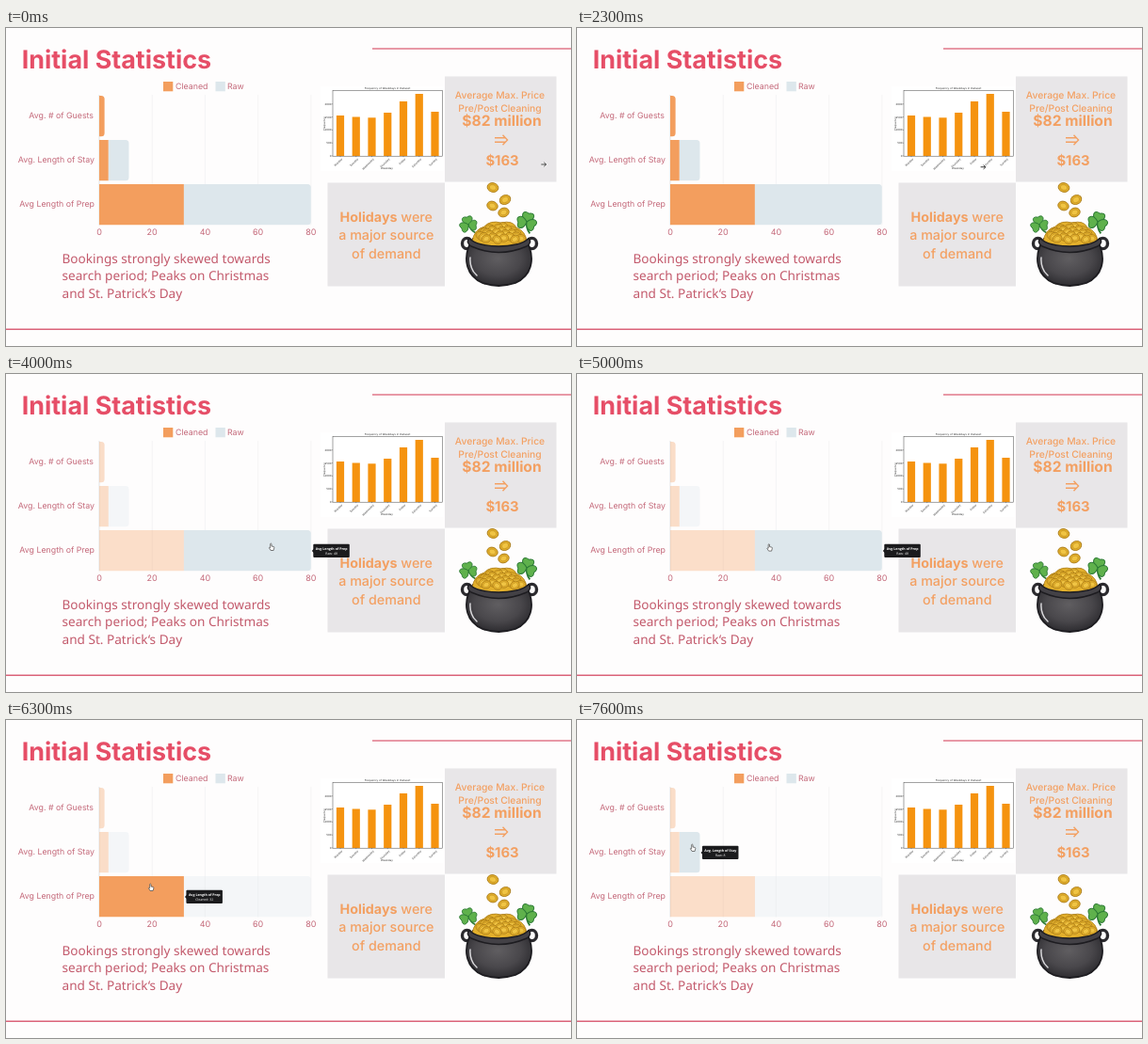
Recreate the animation shown at these times as an HTML page. Size 600x338 px, loop 8 s.

```html
<!DOCTYPE html>
<html lang="en">
<head>
<meta charset="utf-8">
<title>Initial Statistics</title>
<style>
  html, body { margin: 0; width: 100%; height: 100%; overflow: hidden; background: #fefdfd; }
  svg { display: block; width: 100vw; height: 100vh; font-family: Inter, sans-serif; text-rendering: geometricPrecision; }
  .label { font-size: 8.8px; fill: #c4697a; }
  .end { text-anchor: end; }
  .mid { text-anchor: middle; }
  .body { font: 13.6px "Noto Sans", sans-serif; fill: #c35a6c; }
  .card { fill: #e8e6e8; }
  .price, .holiday { fill: #f3a062; text-anchor: middle; font-weight: 500; }
  .price { font-size: 10.3px; }
  .holiday { font-size: 14.3px; }
  .bold { font-weight: 700; }
  .tiny { font: 2.8px "DejaVu Sans", sans-serif; fill: #333; }
</style>
</head>
<body>
<svg viewBox="0 0 600 338">
  <defs>
    <radialGradient id="iron" cx=".48" cy=".42" r=".6">
      <stop offset="0" stop-color="#605e61"/>
      <stop offset=".6" stop-color="#49474b"/>
      <stop offset="1" stop-color="#2b2a2e"/>
    </radialGradient>
    <path id="leaf" d="M0 0C-7 -3 -6 -10 0 -7.3C6 -10 7 -3 0 0" fill="#5fb14c" stroke="#2c7a34" stroke-width=".8"/>
    <g id="clover">
      <path d="M0 0Q1 6 5 9" fill="none" stroke="#2c7a34" stroke-width="1.5"/>
      <use href="#leaf"/>
      <use href="#leaf" transform="rotate(108)"/>
      <use href="#leaf" transform="rotate(-108)"/>
    </g>
    <g id="coin">
      <ellipse rx="5.3" ry="4.8" fill="#e3b02c" stroke="#a97a17" stroke-width=".8"/>
      <ellipse rx="3.4" ry="2.9" fill="#f0c443" stroke="#c08f1f" stroke-width=".6"/>
    </g>
  </defs>

  <path d="M389 22H600" stroke="#e0788a" stroke-width="1.3"/>
  <path d="M0 320.2H600" stroke="#db6379" stroke-width="1.5"/>
  <text x="16.7" y="43" font-size="26.9" font-weight="700" fill="#e64e67">Initial Statistics</text>

  <rect x="167" y="57" width="10.3" height="10.3" fill="#f39e5e"/>
  <rect x="222.5" y="57" width="10.3" height="10.3" fill="#dde7ec"/>
  <text class="label" x="180" y="65">Cleaned</text>
  <text class="label" x="235" y="65">Raw</text>
  <g id="grid"></g>
  <g id="bars"></g>
  <text class="label end" x="93" y="96.2">Avg. # of Guests</text>
  <text class="label end" x="94" y="143.4">Avg. Length of Stay</text>
  <text class="label end" x="94" y="190.4">Avg Length of Prep</text>

  <text class="body" x="59.5" y="249.5">Bookings strongly skewed towards</text>
  <text class="body" x="59.5" y="268.2">search period; Peaks on Christmas</text>
  <text class="body" x="59.5" y="286.8">and St. Patrick‘s Day</text>

  <rect class="card" x="466" y="51.5" width="118.5" height="112"/>
  <rect class="card" x="341.5" y="164.5" width="124.5" height="110"/>
  <text class="price" x="524.5" y="75">Average Max. Price</text>
  <text class="price" x="524.5" y="89">Pre/Post Cleaning</text>
  <text class="price bold" x="526.5" y="104" style="font-size:15.6px">$82 million</text>
  <path d="M519 116.8H530.5M519 121.2H530.5M527.5 113.8L532.5 119L527.5 124.2" fill="none" stroke="#f3a062" stroke-width="1.4"/>
  <text class="price bold" x="527" y="145.5" style="font-size:14.8px">$163</text>
  <text class="holiday" x="403.8" y="206"><tspan class="bold">Holidays</tspan> were</text>
  <text class="holiday" x="403.8" y="225">a major source</text>
  <text class="holiday" x="403.8" y="244.5">of demand</text>

  <g id="weekdays"></g>

  <g id="pot">
    <g id="falling"></g>
    <use href="#clover" transform="translate(491 209) rotate(-12) scale(1.1)"/>
    <use href="#clover" transform="translate(553 206) rotate(14) scale(1.25)"/>
    <g fill="none" stroke="#2b2a2e" stroke-width="3.4">
      <ellipse cx="489.5" cy="229" rx="5" ry="5.6"/>
      <ellipse cx="558.5" cy="229" rx="5" ry="5.6"/>
    </g>
    <path d="M496 224C485 240 486 262 506 271Q523 277 541 271C561 262 562 240 551 224Z" fill="url(#iron)" stroke="#1d1c20" stroke-width="1.8"/>
    <path d="M493 244Q492 256 500 263" fill="none" stroke="#d8d7da" stroke-width="1.5" stroke-linecap="round"/>
    <path d="M495 227Q497 214 508 211Q514 204 526 207Q538 204 542 212Q552 216 553 227Q523 242 495 227Z" fill="#e3b02c" stroke="#a97a17" stroke-width=".8"/>
    <g id="pile"></g>
    <path d="M492 223.5Q496 228 505 230Q523 234 542 230Q551 228 555 223.5Q559 228 553 232Q523 245 494 232Q488 228 492 223.5Z" fill="#434146" stroke="#1d1c20" stroke-width="1.4"/>
  </g>

  <g id="tooltip">
    <path d="M0 0L2.5 -2.5V2.5Z" fill="#1b1b1d"/>
    <rect x="1.5" y="-7.2" width="38.5" height="14.4" rx="1" fill="#1b1b1d"/>
    <g fill="#fff" text-anchor="middle" font-family="Open Sans, sans-serif">
      <text id="tipTitle" x="20.8" y="-1.3" font-size="3.6" font-weight="700"></text>
      <text id="tipValue" x="20.8" y="4.3" font-size="3.5"></text>
    </g>
  </g>

  <g id="cursor" stroke-linejoin="round">
    <g id="arrow" fill="none">
      <path d="M-2.7 0H2.5M.3 -2.2L2.6 0L.3 2.2" stroke="#fff" stroke-width="2"/>
      <path d="M-2.7 0H2.5M.3 -2.2L2.6 0L.3 2.2" stroke="#222" stroke-width=".9"/>
    </g>
    <path id="hand" d="M-1.3 -3.5Q-.6 -4.3 0 -3.4V-1L2.4 -.5Q3 -.2 2.8 .8L2.1 3.5H-.9L-2.6 .8Q-2.5 -.1 -1.3 .6Z" fill="#fff" stroke="#444" stroke-width=".7"/>
    <path id="pointer" d="M-1.8 -3V2.5L-.4 1.4L.6 3.3L1.5 2.8L.7 1.1H2.3Z" fill="#fff" stroke="#333" stroke-width=".7"/>
  </g>
</svg>

<script>
const LOOP = 8000;
const UNIT = 2.81;
const LEFT = 99;
const $ = id => document.getElementById(id);
const clamp = v => Math.max(0, Math.min(1, v));
const text = (cls, x, y, s, extra = "") => `<text class="${cls}" x="${x}" y="${y}" ${extra}>${s}</text>`;
const coin = (x, y, angle, scale) =>
  `<use href="#coin" transform="translate(${x} ${y}) rotate(${angle}) scale(${scale} ${scale * .9})"/>`;

// Stacked bar chart: cleaned and raw lengths for each row.
const rows = [
  { name: "Avg. # of Guests", top: 72, cleaned: 2, raw: 0 },
  { name: "Avg. Length of Stay", top: 119, cleaned: 3.5, raw: 7.7 },
  { name: "Avg Length of Prep", top: 166, cleaned: 32, raw: 48 }
];

$("grid").innerHTML = [0, 20, 40, 60, 80].map(v => {
  const x = LEFT + v * UNIT;
  return `<path d="M${x} 71V209.5" stroke="${v ? "#f1f1f3" : "#dcdcdf"}" stroke-width=".8"/>` +
    text("label mid", x, 219.5, v, 'style="font-size:9px"');
}).join("");

const cells = [];
function addBar(row, start, length, rounded, color) {
  const x = LEFT + start * UNIT, w = length * UNIT, r = rounded ? 3.5 : 0;
  const bar = document.createElementNS("http://www.w3.org/2000/svg", "path");
  bar.setAttribute("d", `M${x} ${row.top}h${w - r}q${r} 0 ${r} ${r}v${43.3 - 2 * r}q0 ${r} ${-r} ${r}h${r - w}z`);
  bar.setAttribute("fill", color);
  $("bars").append(bar);
  cells.push({ bar, row, right: x + w });
}
for (const row of rows) {
  addBar(row, 0, row.cleaned, !row.raw, "#f39e5e");
  if (row.raw) addBar(row, row.cleaned, row.raw, true, "#dde7ec");
}

// Small weekday histogram.
const days = ["Monday", "Tuesday", "Wednesday", "Thursday", "Friday", "Saturday", "Sunday"];
const tops = [93, 94.5, 95.3, 90, 78, 70, 89];
$("weekdays").innerHTML =
  '<rect x="334" y="62" width="131" height="90" fill="#fff"/>' +
  days.map((day, i) => {
    const x = 355 + i * 16.75;
    return `<rect x="${x - 4.1}" y="${tops[i]}" width="8.2" height="${136 - tops[i]}" fill="#f5930f"/>` +
      `<path d="M${x} 136v1.2" stroke="#333" stroke-width=".4"/>` +
      text("tiny end", 0, 0, day, `transform="translate(${x + 2.5} 139.5) rotate(-45)"`);
  }).join("") +
  [0, 500, 1000, 1500, 2000].map((v, i) =>
    text("tiny end", 345.5, 137 - i * 13.8, v) +
    `<path d="M346 ${136 - i * 13.8}h1" stroke="#333" stroke-width=".4"/>`).join("") +
  '<rect x="347" y="66.5" width="116.5" height="69.7" fill="none" stroke="#444" stroke-width=".5"/>' +
  text("tiny mid", 405, 65, "Frequency of Weekdays in Dataset") +
  text("tiny mid", 404.5, 150, "Weekday") +
  text("tiny mid", 0, 0, "Frequency", 'transform="translate(339.3 101.5) rotate(-90)"');

// Gold coins: a few falling, the rest tumbled over the pile.
$("falling").innerHTML = coin(517, 169.5, 15, 1.12) + coin(530, 182.5, -25, 1.12) +
  coin(516.5, 189, 20, 1.1) + coin(528.5, 196, -20, 1.1);
$("pile").innerHTML = Array.from({ length: 26 }, (_, i) => {
  const u = (i * .618) % 1 - .5, depth = i / 25;
  return coin(524 + u * (36 + depth * 14), 210 + depth * 15 + u * u * 28 * (1 - depth), i * 67 % 80 - 40, .95);
}).join("");

// Cursor path as [time, x, y].
const path = [
  [200, 571, 145], [1500, 480.5, 124], [3200, 376, 174.5], [4000, 282, 184],
  [5600, 158, 185], [6300, 154, 178], [6500, 154, 178], [7000, 151, 114], [7600, 123, 136]
];
const hovers = [
  { from: 3650, to: 5250, cell: cells[4], value: "Raw: 48" },
  { from: 5460, to: 6600, cell: cells[3], value: "Cleaned: 32" },
  { from: 7300, to: LOOP, cell: cells[2], value: "Raw: 8" }
];

function cursorAt(t) {
  const next = path.findIndex(p => p[0] > t);
  if (next === 0) return path[0].slice(1);
  if (next < 0) return path[path.length - 1].slice(1);
  const [t0, x0, y0] = path[next - 1], [t1, x1, y1] = path[next];
  const k = (t - t0) / (t1 - t0);
  return [x0 + (x1 - x0) * k, y0 + (y1 - y0) * k];
}

const show = (id, visible) => $(id).style.display = visible ? "" : "none";

function draw(t) {
  const hover = hovers.find(h => t >= h.from && t < h.to);
  const recent = hovers.filter(h => t >= h.from).pop();
  const dim = recent ? Math.min(clamp((t - recent.from - 100) / 200), clamp(1 - (t - recent.to) / 200)) : 0;
  for (const cell of cells)
    cell.bar.setAttribute("opacity", recent && cell !== recent.cell ? 1 - .67 * dim : 1);

  show("tooltip", hover);
  if (hover) {
    const { row, right } = hover.cell;
    $("tooltip").setAttribute("transform", `translate(${right + 1} ${row.top + 21.9})`);
    $("tipTitle").textContent = row.name;
    $("tipValue").textContent = hover.value;
  }

  const early = t < hovers[0].from;
  show("arrow", early);
  show("hand", hover);
  show("pointer", !early && !hover);
  $("cursor").setAttribute("transform", `translate(${cursorAt(t)})`);
}

function tick() {
  // The motion advances in steps of a tenth of a second.
  draw(Math.floor(performance.now() % LOOP / 100) * 100);
  requestAnimationFrame(tick);
}
tick();
</script>
</body>
</html>
```
